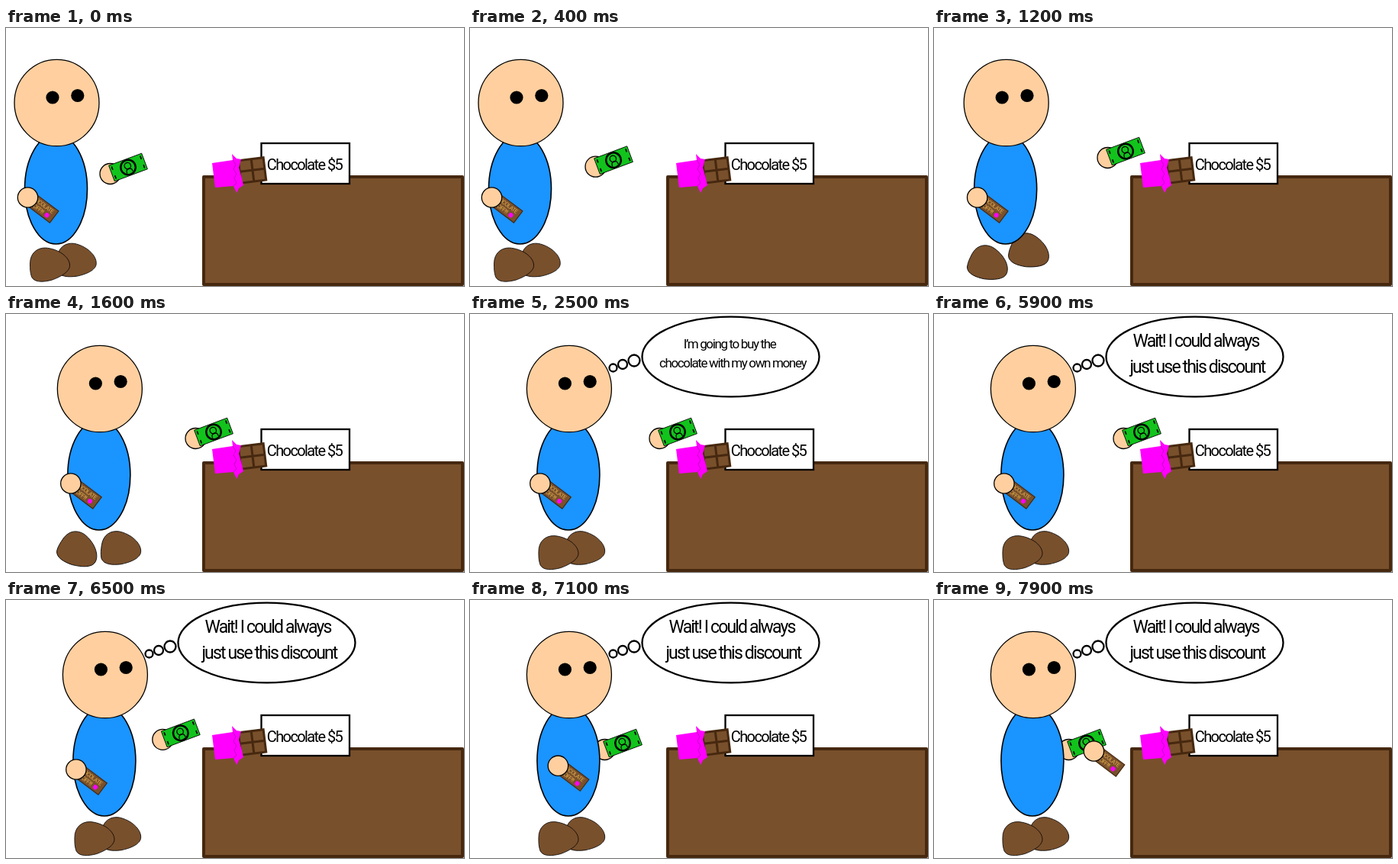
An HTML page that plays this animation: 600x338 px, repeating every 8 s.

```html
<!DOCTYPE html>
<html lang="en">
<head>
<meta charset="utf-8">
<title>Buying chocolate</title>
<style>
  html, body { margin: 0; width: 100%; height: 100%; overflow: hidden; background: #fff; }
  svg { display: block; width: 100%; height: 100%; }
  text { font-family: Roboto, "Liberation Sans", sans-serif; letter-spacing: -.08em; }
  .mid { text-anchor: middle; }
  .skin { fill: #ffcf9f; stroke: #000; stroke-width: 1.3; }
  .wood { fill: #79502c; stroke: #46280f; }
  .foot { fill: #79502c; stroke: #000; stroke-width: .8; }
  .ink { fill: #fff; stroke: #000; stroke-width: 2.3; }
  .line { fill: none; stroke: #000; }
</style>
</head>
<body>
<svg viewBox="0 0 600 338">
  <defs>
    <path id="shoe" class="foot" d="M-26-1C-26-15-17-22-6-22C10-21 25-11 26 0C27 9 14 16 3 20C-8 23-20 24-24 16C-26 10-26 5-26-1Z"/>
  </defs>

  <rect class="wood" x="259" y="195" width="339" height="141" stroke-width="4" stroke-linejoin="round"/>
  <rect class="ink" x="334.5" y="151" width="115.5" height="53"/>
  <text class="mid" x="391" y="186" font-size="20">Chocolate $5</text>

  <g id="chocolate">
    <g class="wood" transform="translate(324 186) rotate(-7)" stroke-width="3">
      <rect x="-18" y="-14.5" width="33" height="29.5"/>
      <path d="M-1-14V15M-18 0H15" fill="none"/>
    </g>
    <path fill="#f0f" d="M270 177L297 173L296 165L302 171L308 172L305 183L309 197L311 206L305 210L302 216L298 207L274 209Z"/>
    <path fill="none" stroke="#c800c8" d="M297 173l4 6-3 6 4 6-3 6 3 6-4 4"/>
  </g>

  <g id="money">
    <circle class="skin" cx="-23.5" cy="8.5" r="13.5"/>
    <g transform="rotate(-20.5)">
      <rect x="-23" y="-11" width="46" height="22" fill="#12c31c" stroke="#000" stroke-width=".8"/>
      <circle class="line" r="9.8" stroke-width="2.5"/>
      <circle class="line" cy="-2" r="4.2" stroke-width="1.3"/>
      <path class="line" d="M-4 7C-5 0 5 0 4 7" stroke-width="1.3"/>
      <path class="line" d="M-20-8.5V-4M-20 4V8.5M20-8.5V-4M20 4V8.5" stroke-width="1.8"/>
    </g>
  </g>

  <use id="rightFoot" href="#shoe"/>
  <use id="leftFoot" href="#shoe"/>
  <g id="body">
    <ellipse cx="65.5" cy="211" rx="41" ry="72" fill="#1a94ff" stroke="#000" stroke-width="1.6"/>
    <ellipse class="skin" cx="66.5" cy="98" rx="55.5" ry="56.7"/>
    <circle cx="61" cy="91" r="8.6"/>
    <circle cx="93.8" cy="88.5" r="8.6"/>
  </g>

  <g id="coupon">
    <g transform="rotate(37)">
      <rect x="2" y="-10" width="41" height="19" class="wood" stroke-width="1.2"/>
      <g fill="#e5b04c" font-size="7.5" text-anchor="end">
        <text x="38" y="-2">CHOCOLATE</text>
        <text x="28" y="6">1/2 OFF!!!</text>
      </g>
      <circle cx="34" cy="3.5" r="3" fill="#f0f"/>
    </g>
    <circle class="skin" r="13.2"/>
  </g>

  <g id="bubble">
    <circle class="ink" cx="187.5" cy="70.5" r="5"/>
    <circle class="ink" cx="200" cy="66" r="6"/>
    <circle class="ink" cx="215" cy="61" r="7.5"/>
    <ellipse class="ink" cx="341.5" cy="56" rx="116" ry="52.3"/>
    <g id="plan" class="mid" font-size="17">
      <text x="340" y="45">I’m going to buy the</text>
      <text x="344" y="70">chocolate with my own money</text>
    </g>
    <g id="idea" class="mid" font-size="23">
      <text x="343" y="43">Wait! I could always</text>
      <text x="345" y="77">just use this discount</text>
    </g>
  </g>
</svg>
<script>
const LOOP = 8000, STEP = 100;
const BUBBLE_AT = 2400, IDEA_AT = 5900, COUPON_AT = 6900;
const WALK = 63.4;
const $ = id => document.getElementById(id);

// Progress from 0 to 1 between two times
const ramp = (t, from, to) => Math.min(1, Math.max(0, (t - from) / (to - from)));

function place(id, x, y, angle = 0) {
  $(id).setAttribute("transform", `translate(${x} ${y}) rotate(${angle})`);
}

function show(id, visible) {
  $(id).style.display = visible ? "" : "none";
}

// A step moves forward while the foot lifts and tilts in one arc
function stepFoot(id, progress, x, y, lift, rest, tilt) {
  const arc = Math.sin(Math.PI * progress);
  place(id, x + (WALK - 5) * progress, y + 2.5 * progress - lift * arc, rest + tilt * arc);
}

function draw(now) {
  const t = Math.floor(now % LOOP / STEP) * STEP;
  const walk = WALK * ramp(t, 800, 1700);
  const reach = .75 * ramp(t, 0, 900) + .25 * ramp(t, 1200, 1500);
  const retreat = ramp(t, IDEA_AT, COUPON_AT);
  const offer = ramp(t, COUPON_AT, 7900);

  place("body", walk, 0);
  // The outstretched hand is carried only by the first part of the walk
  place("money", 160 + 84 * reach + Math.min(walk, 28) - 72 * retreat, 182.5 - 28 * reach + 33 * retreat);
  place("coupon", 28.5 + walk + 117.5 * offer, 222 - 24 * offer);
  stepFoot("rightFoot", ramp(t, 800, 1500), 92.5, 305, 13.5, 8, 16);
  stepFoot("leftFoot", ramp(t, 950, 1950), 57.5, 310, 1.5, 0, 38);

  show("bubble", t >= BUBBLE_AT);
  show("plan", t < IDEA_AT);
  show("idea", t >= IDEA_AT);
}

const start = performance.now();
function tick() {
  draw(performance.now() - start);
  requestAnimationFrame(tick);
}
tick();
</script>
</body>
</html>
```
